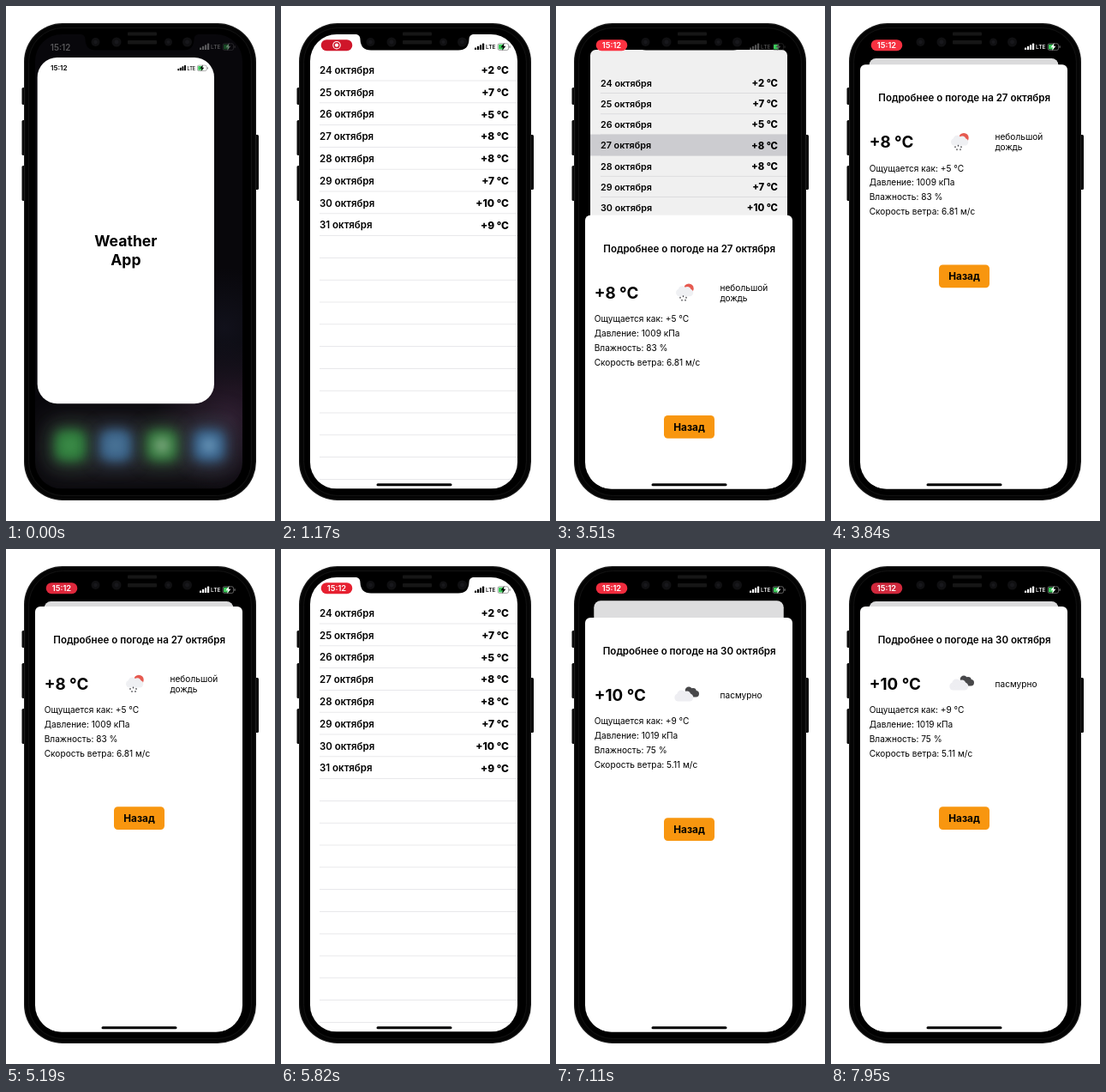
Recreate the animation shown at these times as an HTML page with a canvas. Size 314x600 px, loop 8000 ms.

```html
<!DOCTYPE html>
<html lang="ru">
<head>
<meta charset="utf-8">
<title>Weather App</title>
<style>
html, body { margin: 0; width: 100%; height: 100%; overflow: hidden; background: #fff; }
canvas { display: block; width: 314px; height: 600px; }
</style>
</head>
<body>
<canvas id="stage"></canvas>
<script>
const LOOP = 8000;
const SCREEN = { x: 34, y: 33, w: 242, h: 529.5, r: 31 };
const MID = SCREEN.x + SCREEN.w / 2;
const BOTTOM = SCREEN.y + SCREEN.h;
const ROW = 25.8, FIRST_ROW = 61.6;
const SHEET_TOP = 67;

const temps = [2, 7, 5, 8, 8, 7, 10, 9];
const visits = [
  { row: 3, tap: 3240, open: 3391, close: 5250, end: 5790, icon: rainIcon,
    sky: ['небольшой', 'дождь'],
    facts: ['Ощущается как: +5 °C', 'Давление: 1009 кПа', 'Влажность: 83 %', 'Скорость ветра: 6.81 м/с'] },
  { row: 6, tap: 6670, open: 6809, close: Infinity, end: Infinity, icon: overcastIcon,
    sky: ['пасмурно'],
    facts: ['Ощущается как: +9 °C', 'Давление: 1019 кПа', 'Влажность: 75 %', 'Скорость ветра: 5.11 м/с'] }
];
// time, red, green, blue of the recording pill
const pulse = [
  [800, 218, 28, 46], [1170, 207, 22, 42], [2340, 238, 42, 58], [3510, 252, 50, 65],
  [5190, 222, 40, 60], [5820, 230, 32, 48], [7110, 240, 44, 62], [7950, 208, 40, 60]
];

const canvas = document.getElementById('stage');
const ctx = canvas.getContext('2d');
const ratio = window.devicePixelRatio || 1;
canvas.width = 314 * ratio;
canvas.height = 600 * ratio;

const clamp = v => Math.min(1, Math.max(0, v));
const lerp = (a, b, k) => a + (b - a) * k;
const ramp = (t, from, to) => clamp((t - from) / (to - from));
const gray = v => `rgb(${v},${v},${v})`;

// share of the way still to go in a critically damped spring
function rest(ms, speed = 18.26) {
  const x = Math.max(0, ms) / 1000 * speed;
  return (1 + x) * Math.exp(-x);
}

function group(draw, alpha = 1) {
  if (alpha <= 0) return;
  ctx.save();
  ctx.globalAlpha *= alpha;
  draw();
  ctx.restore();
}

function box(x, y, w, h, r, color) {
  ctx.beginPath();
  ctx.roundRect(x, y, w, h, r);
  if (color) { ctx.fillStyle = color; ctx.fill(); }
}

function fillScreen(color) {
  ctx.fillStyle = color;
  ctx.fillRect(SCREEN.x, SCREEN.y, SCREEN.w, SCREEN.h);
}

function disc(x, y, r, color) {
  ctx.beginPath();
  ctx.arc(x, y, r, 0, Math.PI * 2);
  ctx.fillStyle = color;
  ctx.fill();
}

// y is the middle of the capital letters
function label(str, x, y, size, weight = 400, align = 'left', color = '#000') {
  ctx.font = `${weight} ${size}px Inter, Roboto, sans-serif`;
  ctx.textAlign = align;
  ctx.fillStyle = color;
  ctx.fillText(str, x, y + size * 0.364);
}

function phoneBody() {
  for (const [y, h] of [[95, 20], [133, 41], [186, 41]]) box(18.5, y, 6, h, 1.5, '#0a0a0a');
  box(289, 150, 6, 64, 1.5, '#0a0a0a');
  box(21, 20, 271, 556, 45, '#1c1c1c');
  box(22.2, 21.2, 268.6, 553.6, 44, '#040404');
  box(26.5, 25.5, 260, 545, 40);
  ctx.strokeStyle = '#121212';
  ctx.lineWidth = 1;
  ctx.stroke();
  box(27.5, 26.5, 258, 543, 39, '#000');
}

function notch() {
  ctx.beginPath();
  ctx.moveTo(86, 32);
  ctx.lineTo(88, 33);
  ctx.quadraticCurveTo(92.5, 34, 92.5, 39);
  ctx.quadraticCurveTo(93, 51.5, 105, 51.5);
  ctx.lineTo(207, 51.5);
  ctx.quadraticCurveTo(219, 51.5, 219.5, 39);
  ctx.quadraticCurveTo(219.5, 34, 224, 33);
  ctx.lineTo(226, 32);
  ctx.fillStyle = '#000';
  ctx.fill();
  for (const [x, r] of [[104.5, 5], [129, 5.5], [189.5, 4.5], [211.5, 5.5]]) {
    disc(x, 42, r, '#101012');
    disc(x, 42, r * 0.45, '#18181c');
  }
  box(142, 30.5, 34, 4, 1, '#161616');
  box(142, 40, 34, 4.5, 1, '#161616');
}

function statusIcons(ink) {
  for (let i = 0; i < 4; i++) {
    const h = 2.6 + i * 1.6;
    box(226 + i * 3, 51 - h, 2.2, h, 0.6, ink);
  }
  label('LTE', 239, 48, 6.7, 500, 'left', ink);
  group(() => {
    box(253, 43.8, 12.6, 7.6, 2);
    ctx.strokeStyle = ink;
    ctx.lineWidth = 0.8;
    ctx.stroke();
    box(266.4, 46.2, 1.3, 2.8, 0.7, ink);
  }, 0.45);
  box(254, 44.8, 6.2, 5.6, 1, '#3ccb5a');
  ctx.beginPath();
  [[260.6, 43], [256.4, 48.2], [259, 48.2], [258, 52], [262.4, 46.8], [259.8, 46.8]]
    .forEach(([x, y]) => ctx.lineTo(x, y));
  ctx.closePath();
  ctx.fillStyle = ink;
  ctx.fill();
}

function pillColor(t) {
  let i = 0;
  while (i < pulse.length - 2 && pulse[i + 1][0] < t) i++;
  const a = pulse[i], b = pulse[i + 1], k = ramp(t, a[0], b[0]);
  return `rgb(${[1, 2, 3].map(c => Math.round(lerp(a[c], b[c], k)))})`;
}

function pill(t) {
  box(46.7, 39.2, 36.6, 13, 6.5, pillColor(t));
  const time = ramp(t, 2550, 2750);
  group(() => {
    disc(65, 45.7, 2.1, '#fff');
    ctx.beginPath();
    ctx.arc(65, 45.7, 4.2, 0, Math.PI * 2);
    ctx.strokeStyle = '#fff';
    ctx.lineWidth = 1.1;
    ctx.stroke();
  }, 1 - time);
  group(() => label('15:12', 65, 45.8, 9.3, 600, 'center', '#fff'), time);
}

function home(fade) {
  fillScreen('#08070b');
  for (const [x, y, r, c] of [[262, 480, 90, '58,36,60'], [255, 375, 70, '20,20,32']]) {
    const g = ctx.createRadialGradient(x, y, 0, x, y, r);
    g.addColorStop(0, `rgba(${c},.75)`);
    g.addColorStop(1, `rgba(${c},0)`);
    fillScreen(g);
  }
  const blur = px => { ctx.filter = `blur(${px * ratio}px)`; };
  group(() => {
    blur(14);
    box(42, 478, 226, 70, 20, 'rgba(62,60,66,.55)');
    [[75, '#2f7a3c', '#3c8c48'], [128, '#3c648a', '#4a7496'],
     [182, '#367a40', '#76a478'], [237, '#3a648c', '#6491b4']].forEach(([x, c, core]) => {
      blur(10);
      group(() => box(x - 23, 489, 46, 46, 14, c), 0.35);
      blur(6);
      box(x - 18, 494, 36, 36, 10, c);
      box(x - 9, 503, 18, 18, 8, core);
    });
  });
  group(() => {
    label('15:12', 63.5, 48, 9.8, 600, 'center', '#fff');
    statusIcons('#fff');
  }, 0.33 * fade);
}

function splash(t) {
  const left = rest(t + 214, 14) / rest(214, 14);
  if (left > 0.002) home(left);
  const s = lerp(1, 0.851, left);
  const x = lerp(SCREEN.x, 36.7, left), y = lerp(SCREEN.y, 60.2, left);
  group(() => {
    box(x, y, SCREEN.w * s, lerp(SCREEN.h, 402, left), lerp(SCREEN.r, 23, left), '#fff');
    ctx.clip();
    ctx.translate(x, y);
    ctx.scale(s, s);
    ctx.translate(-SCREEN.x, -SCREEN.y);
    label('Weather', MID, 283.5, 20.6, 700, 'center');
    label('App', MID, 309.3, 20.6, 700, 'center');
    label('15:12', 63.5, 47.6, 9.6, 600, 'center');
    statusIcons('#000');
  });
}

// lines reach past the screen edge, the caller clips them
function list(selected) {
  for (let i = 0; i < 19; i++) {
    const top = FIRST_ROW + i * ROW;
    ctx.fillStyle = '#e3e3e6';
    ctx.fillRect(45, top + ROW - 0.8, 240, 0.8);
    if (i === selected) {
      ctx.fillStyle = '#d9d9dd';
      ctx.fillRect(SCREEN.x - 8, top - 0.8, SCREEN.w + 16, ROW + 0.8);
    }
    if (i < temps.length) {
      const y = top + ROW / 2 + 0.1;
      label(`${24 + i} октября`, 45, y, 11.5, 600);
      label(`+${temps[i]} °C`, 266, y, 12, 800, 'right');
    }
  }
}

function card(p, selected) {
  const top = lerp(SCREEN.y, 61, p);
  const width = SCREEN.w * (1 - 0.088 * Math.pow(p, 1.3));
  const s = 1 - 0.088 * Math.pow(p, 0.75);
  group(() => {
    box(MID - width / 2, top, width, SCREEN.h, 8 * Math.sqrt(p), '#fff');
    ctx.clip();
    group(() => {
      ctx.translate(MID, top);
      ctx.scale(s, s);
      ctx.translate(-MID, -SCREEN.y);
      list(selected);
    });
    fillScreen(`rgba(0,0,10,${0.14 * p * p})`);
  });
}

function cloud(x, y, k, color) {
  box(x, y + 5 * k, 22 * k, 9 * k, 4.5 * k, color);
  disc(x + 8 * k, y + 6 * k, 5 * k, color);
  disc(x + 14.5 * k, y + 6.5 * k, 4.5 * k, color);
}

function rainIcon() {
  disc(155, 152.4, 5.7, '#e65a50');
  cloud(140, 148.5, 0.92, '#eff0f3');
  for (const [x, y] of [[145, 163], [148.5, 161.5], [152, 163], [147, 166], [151, 166]])
    box(x - 0.7, y - 0.9, 1.4, 1.8, 0.6, '#45454a');
}

function overcastIcon() {
  disc(155, 151.6, 4.2, '#474749');
  disc(160, 153, 3.9, '#474749');
  box(151, 152, 16, 7.5, 3.7, '#474749');
  cloud(138.3, 150.5, 1, '#eeeef2');
}

function sheet(visit, p) {
  group(() => {
    ctx.translate(0, lerp(BOTTOM, SHEET_TOP, p) - SHEET_TOP);
    box(SCREEN.x, SHEET_TOP, SCREEN.w, SCREEN.h, 6, '#fff');
    label(`Подробнее о погоде на ${24 + visit.row} октября`, MID + 0.7, 105.8, 11.55, 600, 'center');
    label(`+${temps[visit.row]} °C`, 44.7, 157.2, 18.8, 700);
    visit.icon();
    visit.sky.forEach((line, i) =>
      label(line, 191.5, 157.3 + (i - (visit.sky.length - 1) / 2) * 12.4, 10.15));
    visit.facts.forEach((line, i) => label(line, 44.7, 187.6 + i * 16.9, 10.15));
    box(126, 300.3, 59, 26.7, 4.5, '#f8960f');
    label('Назад', 155.5, 313.8, 11.8, 700, 'center');
  });
}

function app(t) {
  const visit = visits.find(v => t >= v.tap && t < v.end);
  let p = 0;
  if (visit) p = t < visit.close ? 1 - rest(t - visit.open) : rest(t - visit.close);
  fillScreen('#000');
  card(p, visit && t < visit.open + 600 ? visit.row : -1);
  if (p > 0) sheet(visit, p);
  statusIcons(gray(Math.round(255 * ramp(p, 0.5, 0.95))));
  pill(t);
  box(111.5, 556.2, 88, 3, 1.5, '#000');
}

function draw(t) {
  ctx.setTransform(ratio, 0, 0, ratio, 0, 0);
  ctx.fillStyle = '#fff';
  ctx.fillRect(0, 0, 314, 600);
  phoneBody();
  group(() => {
    box(SCREEN.x, SCREEN.y, SCREEN.w, SCREEN.h, SCREEN.r);
    ctx.clip();
    const ready = ramp(t, 560, 780);
    if (ready < 1) splash(t);
    group(() => app(t), ready);
  });
  notch();
}

function tick() {
  draw(performance.now() % LOOP);
  requestAnimationFrame(tick);
}
tick();
</script>
</body>
</html>
```
